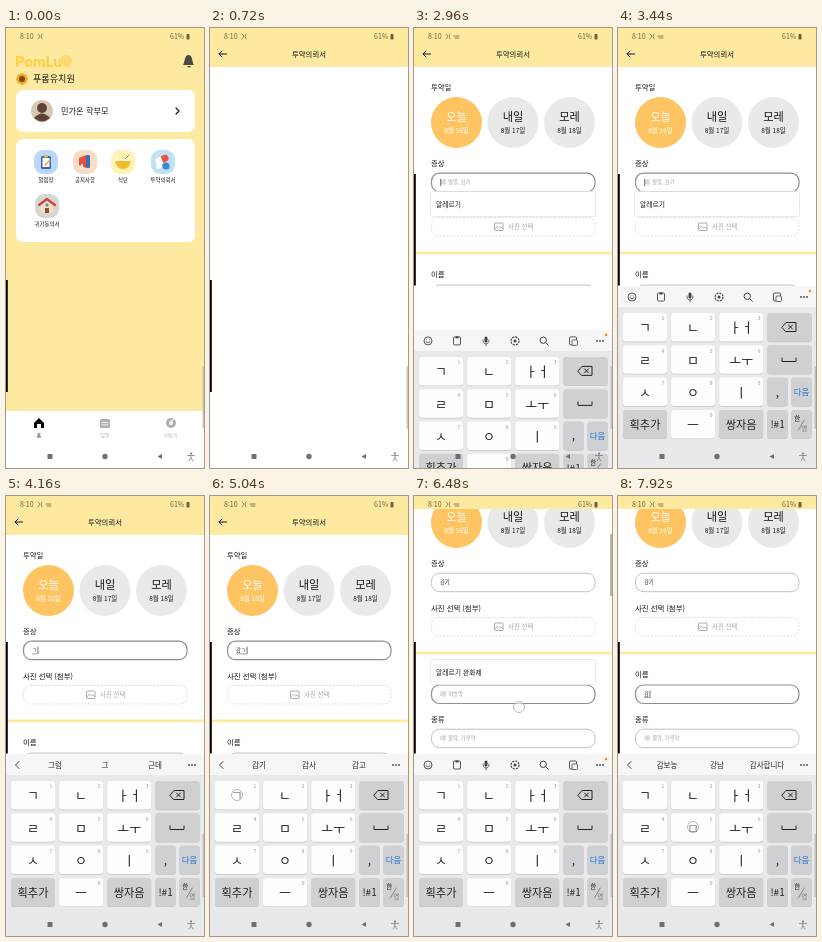
Animation of 198x440 px, one loop 8000 ms. Source, as an HTML page:

```html
<!DOCTYPE html>
<html lang="ko">
<head>
<meta charset="utf-8">
<style>
html, body { margin: 0; width: 100%; height: 100%; overflow: hidden; background: #fff; }
svg { display: block; width: 198px; height: 440px; font-family: "Noto Sans CJK KR", "Noto Sans CJK", "Noto Sans", sans-serif; }
</style>
</head>
<body>
<svg id="stage" viewBox="0 0 198 440"></svg>
<script>
const LOOP = 8000, KEYBOARD_AT = 2810, SCROLL = 68;
const YELLOW = '#fdeaa0', INK = '#151515', GREY = '#b0b0b0';
const stage = document.getElementById('stage');

const progress = (t, start, length) => Math.min(1, Math.max(0, (t - start) / length));
const easeOut = u => 1 - (1 - u) ** 3;
const easeInOut = u => u * u * (3 - 2 * u);

// Drawing helpers; text is centred vertically on y.
const rect = (x, y, w, h, fill, r = 0, more = '') =>
  `<rect x="${x}" y="${y}" width="${w}" height="${h}" rx="${r}" fill="${fill}" ${more}/>`;
const circle = (x, y, r, fill, more = '') => `<circle cx="${x}" cy="${y}" r="${r}" fill="${fill}" ${more}/>`;
const path = (d, fill, more = '') => `<path d="${d}" fill="${fill}" ${more}/>`;
const line = (d, color = INK, w = 1) =>
  path(d, 'none', `stroke="${color}" stroke-width="${w}" stroke-linecap="round" stroke-linejoin="round"`);
const text = (x, y, s, size, fill = INK, weight = 400, anchor = 'start') =>
  `<text x="${x}" y="${y + size * .37}" font-size="${size}" fill="${fill}" font-weight="${weight}" text-anchor="${anchor}">${s}</text>`;
const mid = (x, y, s, size, fill, weight) => text(x, y, s, size, fill, weight, 'middle');
const at = (x, y, body) => `<g transform="translate(${x} ${y})">${body}</g>`;
const clip = (bottom, body) => `<svg width="198" height="${bottom}" viewBox="0 0 198 ${bottom}">${body}</svg>`;

// Typing: time, field, text, touched key and suggestions
const TYPING = [
  [3760, 0, 'ㄱ', 27, 299, ['그럼', '그', '근데']],
  [4400, 0, '가', 123, 299, ['가서', '가', '가족']],
  [4720, 0, '감', 75, 331, ['감사합니다', '감', '감기']],
  [5040, 0, '감ㄱ', 27, 299, ['감기', '감사', '감고']],
  [5360, 0, '감기', 123, 364, ['감기용', '감사합', '감기']],
  [7120, 1, 'ㄱ', 27, 299, ['그럼', '그', '근데']],
  [7520, 1, '가', 123, 299, ['가서', '가', '가족']],
  [7900, 1, '감', 75, 331, ['감보능', '강남', '감사합니다']],
];
const TAPS = [[2400, 42, 94], [2700, 100, 154], [6380, 105, 211],
  ...TYPING.map(([time, , , x, y]) => [time, x, y])];

const typed = (t, field) => TYPING.filter(k => k[0] <= t && k[1] === field).pop();
const focusAt = t => t < 2760 ? -1 : t < 6400 ? 0 : 1;

function statusBar(t) {
  const c = '#6b6242';
  return rect(0, 0, 198, 13, YELLOW) + text(14, 8.5, '8:10', 7, c) +
    line('M32 6l2 2l-2 3M36 6l-1 2l1 3', c, .7) +
    (t > 2400 ? line('M40 8h5M41 10h4', c, .8) : '') +
    text(164, 8.5, '61%', 7, c) + rect(180.5, 6, 3, 5.5, c, .7);
}

function systemNav() {
  const c = '#707070';
  return rect(41.5, 426, 5, 5, c, .5) + circle(99, 428.5, 2.7, c) + path('M156 426v5l-4.5-2.5z', c) +
    circle(185, 425.5, 1, c) + line('M181.5 427.5h7M185 427.5v2.5l-2 3M185 430l2 3', c, .7);
}

function home() {
  const tile = (x, y, color, label, art) =>
    rect(x - 12, y - 12, 24, 24, color, 9) + at(x, y, art) + mid(x, y + 18, label, 5.4, INK, 500);
  const petals = [...Array(8)].map((_, i) =>
    circle(16 + 4 * Math.cos(i * Math.PI / 4), 51 + 4 * Math.sin(i * Math.PI / 4), 2, '#f5a623')).join('');
  const tab = (x, label, color, art) => at(x, 395, art) + mid(x, 407, label, 4.8, color);
  return rect(0, 0, 198, 383, YELLOW) + rect(0, 383, 198, 57, '#fff') +
    `<text x="9" y="39" font-size="15" font-weight="900" fill="#ffcf4a" font-family="Lato, sans-serif">PomLu</text>` +
    circle(60, 33, 6, '#ffd873') +
    path('M177 37c2-2 1-10 5.500-10s3.500 8 5.500 10zM181 38h4q-2 3-4 0', '#4a4a4a') +
    petals + circle(16, 51, 3, '#7a4a24') + text(27, 51, '푸롬유치원', 9.1, INK, 500) +
    rect(10, 62, 179, 42, '#fff', 7) + circle(36, 83, 11, '#d9c7b4') +
    circle(36, 80, 5, '#5b4436') + path('M28 90q8-9 16 0q-8 7-16 0', '#5b4436') +
    text(55, 83, '민가온 학부모', 8.2, INK, 500) + line('M170 80l3 3l-3 3', INK, 1.2) +
    rect(10, 111, 179, 103, '#fff', 7) +
    tile(40, 134, '#bcd7f8', '알림장',
      rect(-5, -6, 10, 13, '#3568b2', 1.5) + rect(-3.5, -4, 7, 9, '#fff') + rect(-2, -7, 4, 2.500, '#f4b63f') + line('M-1 3l5-5', '#f4a030', 1.5)) +
    tile(79, 134, '#f9dcc4', '공지사항',
      path('M-6-4l7-3v13l-7-3z', '#e8503c') + rect(1, -7, 4, 13, '#3d6fae', 1) + line('M-3 3v4', '#f2f2f2', 2)) +
    tile(117, 134, '#fff2b5', '식단',
      path('M-8-2h16q-1 9-8 9t-8-9', '#f1bd2c') + rect(-8, -3, 16, 2, '#fff8dc') + line('M2-3l4-4', '#b98540', 1)) +
    tile(157, 134, '#bfe0f6', '투약의뢰서',
      `<g transform="rotate(-25)">${rect(-7, -6, 14, 7, '#fff', 3.5)}${path('M0-6h3.500a3.500 3.500 0 0 1 0 7H0z', '#ea5545')}</g>` +
      circle(3, 4, 3.6, '#3d87d2') + circle(-4, 4, 3, '#fff')) +
    tile(41, 178, '#d8d6d4', '귀가동의서',
      rect(-6, -2, 12, 9, '#f5dec0') + line('M-8-1l8-6l8 6', '#c8493d', 2.200) + rect(-2, 2, 4, 5, '#8a5538') + circle(0, -1, 1.500, '#5e87ae')) +
    tab(33, '홈', INK, path('M-5 0l5-5l5 5v5h-3v-4h-4v4h-3z', '#000')) +
    tab(99, '일정', GREY, rect(-5, -4, 10, 9, GREY, 1.5) + rect(-3.5, -1, 7, .8, '#fff') + rect(-3.5, 1.500, 7, .8, '#fff')) +
    tab(165, '더보기', GREY, circle(0, 0, 5, GREY) + circle(0, 0, 2, '#fff') + line('M0-2l3-2', '#fff', 1));
}

const header = () => rect(0, 0, 198, 39, YELLOW) + line('M16.500 26H9l3-3M9 26l3 3', INK, 1) +
  mid(99, 26, '투약의뢰서', 7.4, INK, 500);

const blankPage = () => rect(0, 0, 198, 440, '#fff') + header();

function formContent(t) {
  const focus = focusAt(t);
  const label = (y, s) => text(17, y, s, 7.4, INK, 500);
  const cursor = x => (t - 2960 + 40) % 1000 < 560 ? x : null;

  const field = (y, hint, index = -2) => {
    const active = focus === index, entry = typed(t, index);
    const value = entry ? entry[2] : '';
    const width = value.length * 5.1, caret = active ? cursor(26.500 + width) : null;
    const composing = active && value;
    return rect(17.500, y, 163.500, 18.5, '#fff', 8, `stroke="${active ? '#8e8e94' : '#a8a8a8'}" stroke-width="${active ? 1.2 : .7}"`) +
      text(26, y + 9.3, value || hint, 5.3, value ? '#333' : '#a5a5a5') +
      (composing ? rect(26, y + 12.5, width, .5, '#555') : '') +
      (caret ? rect(caret, y + 5.500, .7, 7.5, '#333') : '');
  };

  const day = (x, name, date, on) => circle(x, 94.500, 25.500, on ? '#ffc462' : '#e9e9e9') +
    mid(x, 89, name, 11.2, on ? '#fff' : INK, 500) + mid(x, 103, date, 6.5, on ? '#fff' : INK, 500);

  const dropdown = (y, s) => rect(16.500, y, 165, 25, '#fff', 2, 'stroke="#e4e4e4" stroke-width=".8"') +
    text(22, y + 12.5, s, 6.8, INK);

  return header() + label(59, '투약일') +
    day(42.5, '오늘', '8월 16일', t >= 2440) + day(99, '내일', '8월 17일') + day(155.5, '모레', '8월 18일') +
    label(135, '증상') + field(145.2, '예) 발열, 감기', 0) +
    label(180, '사진 선택 (첨부)') +
    rect(17.500, 189.5, 163.500, 18.5, '#fff', 7, 'stroke="#cfcfcf" stroke-width=".7" stroke-dasharray="2 1.500"') +
    rect(80.500, 195, 8.500, 7.500, 'none', .8, 'stroke="#999" stroke-width=".8"') +
    line('M81 201l2.500-3l2 2l1.500-1l2 2', '#999', .7) + text(94, 199, '사진 선택', 6.4, '#a5a5a5') +
    rect(0, 223.5, 198, 2.700, YELLOW) +
    label(246, '이름') + field(257, '예) 처방약', 1) +
    label(291, '종류') + field(301.2, '예) 물약, 가루약') +
    label(335, '용량') + field(345.5, '직접 입력') + label(380, '횟수') +
    (t >= 2860 && t < 3720 ? dropdown(163.5, '알레르기') : '') +
    (t >= 6440 && t < 7120 ? dropdown(163.500 + SCROLL, '알레르기 완화제') : '');
}

const scrollAt = t => SCROLL * easeInOut(progress(t, 5800, 400));

function form(t) {
  const open = t >= KEYBOARD_AT;
  return rect(0, 0, 198, 440, '#fff') +
    clip(open ? 258 : 382.5, at(0, -scrollAt(t), formContent(t))) +
    (open ? '' : rect(0, 382.5, 198, .5, '#e4e4e4') + rect(13.500, 390, 171.500, 19.5, '#adadad', 3) +
      mid(99, 399.5, '등록하기', 7.2, '#fff', 500));
}

function toolbar(t) {
  const c = '#444', entry = typed(t, focusAt(t));
  const dots = [183, 186, 189].map(x => circle(x, 269, .9, c)).join('');
  if (entry) return line('M13 265.500l-3.500 3.500l3.500 3.500', c, 1) + dots +
    entry[5].map((s, i) => mid(49 + 50 * i, 269, s, 7.5, '#222')).join('');
  const ring = circle(0, 0, 4, 'none', `stroke="${c}" stroke-width=".9"`);
  const box = rect(-3.5, -4, 7, 8, 'none', 1, `stroke="${c}" stroke-width=".9"`);
  const icons = [
    ring + line('M-2 1q2 2 4 0M-1.500-1v0M1.500-1v0', c, .8),
    box + rect(-1.5, -4.500, 3, 2, c),
    rect(-1.5, -4.500, 3, 6, c, 1.5) + line('M-3-1q0 4 3 4t3-4M0 3v2', c, .8),
    circle(0, 0, 4, 'none', `stroke="${c}" stroke-width="1.200" stroke-dasharray="2.200 .9"`) + circle(0, 0, 1.500, c),
    at(-.7, -.7, circle(0, 0, 3.2, 'none', `stroke="${c}" stroke-width="1"`) + line('M2.500 2.500l2.500 2.500', c, 1)),
    box + rect(-1, -1, 5.500, 5.500, '#f6f6f7', 1, `stroke="${c}" stroke-width=".8"`),
  ];
  return icons.map((art, i) => at(14 + 29 * i, 269, art)).join('') + dots + circle(192, 263, 1.3, '#f08a24');
}

function keyboard(t) {
  const rowY = r => 285 + 32.3 * r, colX = c => 5 + 48.1 * c;
  const key = (x, r, w, s, size, special, color = '#222') =>
    rect(x, rowY(r) + .7, w, 28.5, '#c2c4c8', 3) + rect(x, rowY(r), w, 28.5, special ? '#cfd0d2' : '#fdfdfd', 3) +
    mid(x + w / 2, rowY(r) + 14.5, s, size, color);
  const letters = ['ㄱ', 'ㄴ', 'ㅏㅓ', 'ㄹ', 'ㅁ', 'ㅗㅜ', 'ㅅ', 'ㅇ', 'ㅣ', '획추가', 'ㅡ', '쌍자음'];
  const main = letters.map((s, i) => {
    const r = Math.floor(i / 3), x = colX(i % 3), special = s.length > 2;
    return key(x, r, 44, s, special ? 11.2 : 13, special) +
      (special ? '' : mid(x + 40, rowY(r) + 5.500, i === 10 ? 0 : i + 1, 5, '#999'));
  }).join('');
  const x = colX(3), half = 20.5, x2 = x + 24;
  return rect(0, 258, 198, 182, '#e8e9eb') + rect(0, 258, 198, 21, '#f6f6f7') + toolbar(t) + main +
    key(x, 0, 44.5, '', 8, true) + line('M164 299l4-4.500h10v9h-10zM170.500 297l4 4M174.500 297l-4 4', '#222', 1) +
    key(x, 1, 44.5, '', 8, true) + line('M164 330v3.500h14v-3.500', '#222', 1) +
    key(x, 2, half, ',', 12, true) + key(x2, 2, half, '다음', 8.5, true, '#2478d8') +
    key(x, 3, half, '!#1', 10, true) + key(x2, 3, half, '', 8, true) +
    text(x2 + 3, 391, '한', 6.5) + text(x2 + 10, 401, '영', 6.5, '#777') + line(`M${x2 + 7} 402l6-10`, '#555', .6);
}

function touches(t) {
  const dot = (x, y, alpha) => circle(x, y, 5.500, '#fff',
    `fill-opacity=".5" stroke="#999" stroke-width=".7" opacity="${alpha}"`);
  const taps = TAPS.filter(([start]) => t >= start && t < start + 220)
    .map(([start, x, y]) => dot(x, y, 1 - progress(t, start + 140, 80) * .7)).join('');
  return taps + (t >= 5700 && t < 6200 ? dot(145, 168 - scrollAt(t), 1) : '');
}

function edgeMarks(t) {
  const open = t >= KEYBOARD_AT;
  const bar = t < 5800 ? 0 : 1 - progress(t, 7120, 500);
  return rect(0, open ? 146 : 252, 1.8, open ? 111.500 : 112, '#000') +
    rect(196.5, 338, 1.500, 63, '#b9b9b9', .7, 'opacity=".8"') +
    rect(196, 38, 2, 62, '#b5b5b5', 0, `opacity="${bar}"`);
}

function scene(t) {
  const first = easeOut(progress(t, 240, 340)), second = easeOut(progress(t, 1260, 300));
  const pages = [
    first < 1 ? home() : '',
    first > 0 && second < 1 ? at(198 * (1 - first), 0, blankPage()) : '',
    second > 0 ? at(198 * (1 - second), 0, form(t)) : '',
  ].join('');
  const slide = easeOut(progress(t, KEYBOARD_AT, 400));
  return pages + (t >= KEYBOARD_AT ? at(0, 182 * (1 - slide), keyboard(t)) : '') +
    statusBar(t) + systemNav() + edgeMarks(t) + touches(t);
}

function frame() {
  stage.innerHTML = scene(performance.now() % LOOP);
  requestAnimationFrame(frame);
}
frame();
</script>
</body>
</html>
```
